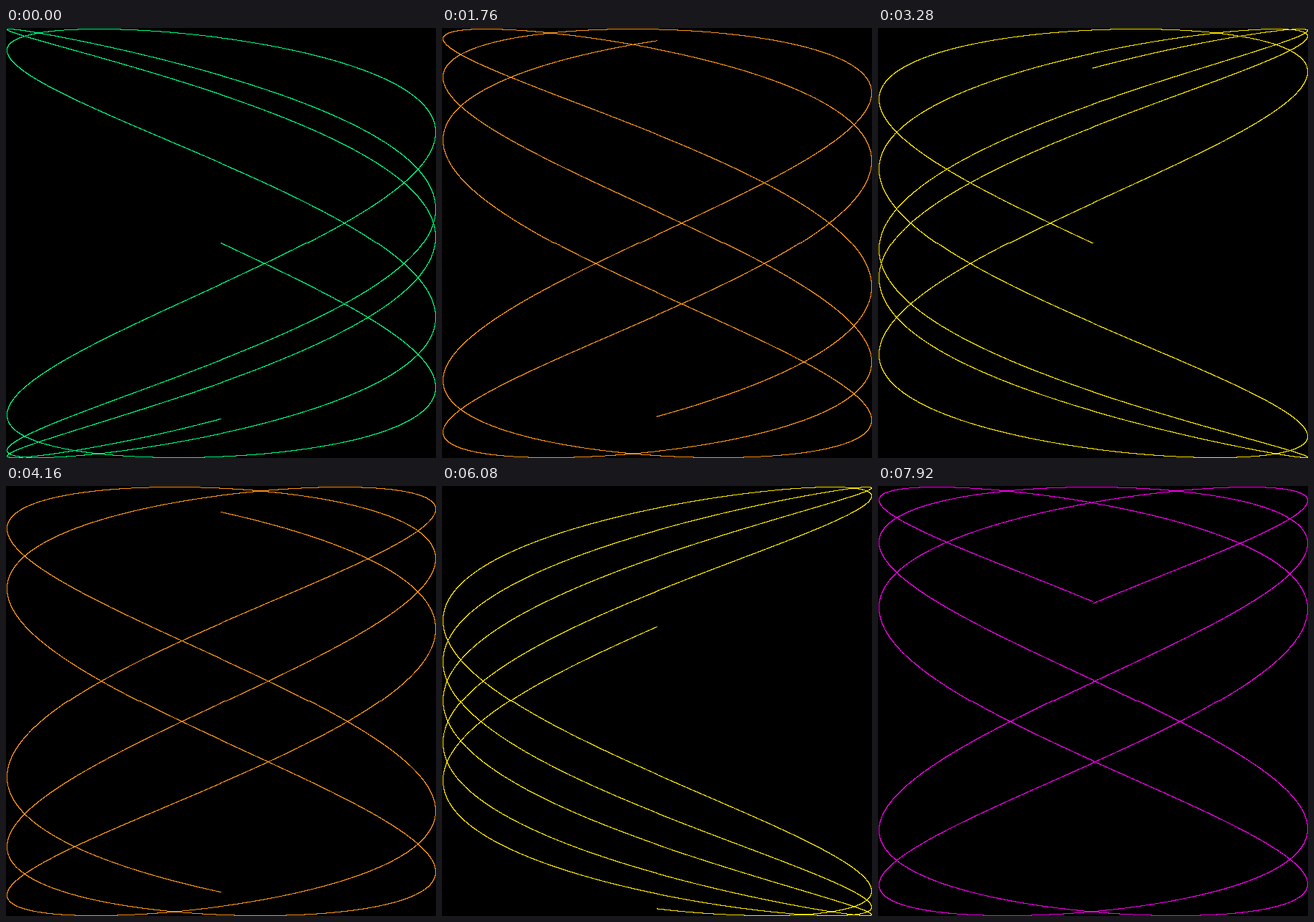
These frames come from a looping animation (601 by 601 pixels, 8000 ms). An HTML page with a canvas:

```html
<!DOCTYPE html>
<html lang="en">
<head>
<meta charset="utf-8">
<title>Lissajous curve</title>
<style>
  html, body { margin: 0; width: 100%; height: 100%; overflow: hidden; background: #000; }
  canvas { display: block; }
</style>
</head>
<body>
<canvas id="stage" width="601" height="601"></canvas>
<script>
const SIZE = 300, WIDTH = 2 * SIZE + 1;
const CYCLES = 5, STEP = 0.001, FREQ = 0.469488;
const FRAMES = 100, DELAY = 80;
const COLORS = [[0, 255, 128], [255, 230, 0], [255, 147, 24], [255, 90, 0], [255, 0, 240]];

const ctx = document.getElementById('stage').getContext('2d');
const image = ctx.createImageData(WIDTH, WIDTH);
const pixels = new Uint32Array(image.data.buffer);
const pack = (r, g, b) => (255 << 24 | b << 16 | g << 8 | r) >>> 0;
const BLACK = pack(0, 0, 0);

// Truncation toward zero gives the curve its small kink at the centre.
const toPixel = v => SIZE + Math.trunc(v * SIZE + 0.5);

function draw(frame) {
  const phase = frame * 0.1;
  const color = pack(...COLORS[frame % COLORS.length]);
  pixels.fill(BLACK);
  for (let t = 0; t < CYCLES * 2 * Math.PI; t += STEP) {
    const x = toPixel(Math.sin(t));
    const y = toPixel(Math.sin(t * FREQ + phase));
    pixels[y * WIDTH + x] = color;
  }
  ctx.putImageData(image, 0, 0);
}

let shown = 0;
const start = performance.now();
function tick() {
  const elapsed = Math.max(0, performance.now() - start);
  const frame = Math.floor(elapsed / DELAY) % FRAMES;
  if (frame !== shown) draw(shown = frame);
  requestAnimationFrame(tick);
}
draw(0);
requestAnimationFrame(tick);
</script>
</body>
</html>
```
